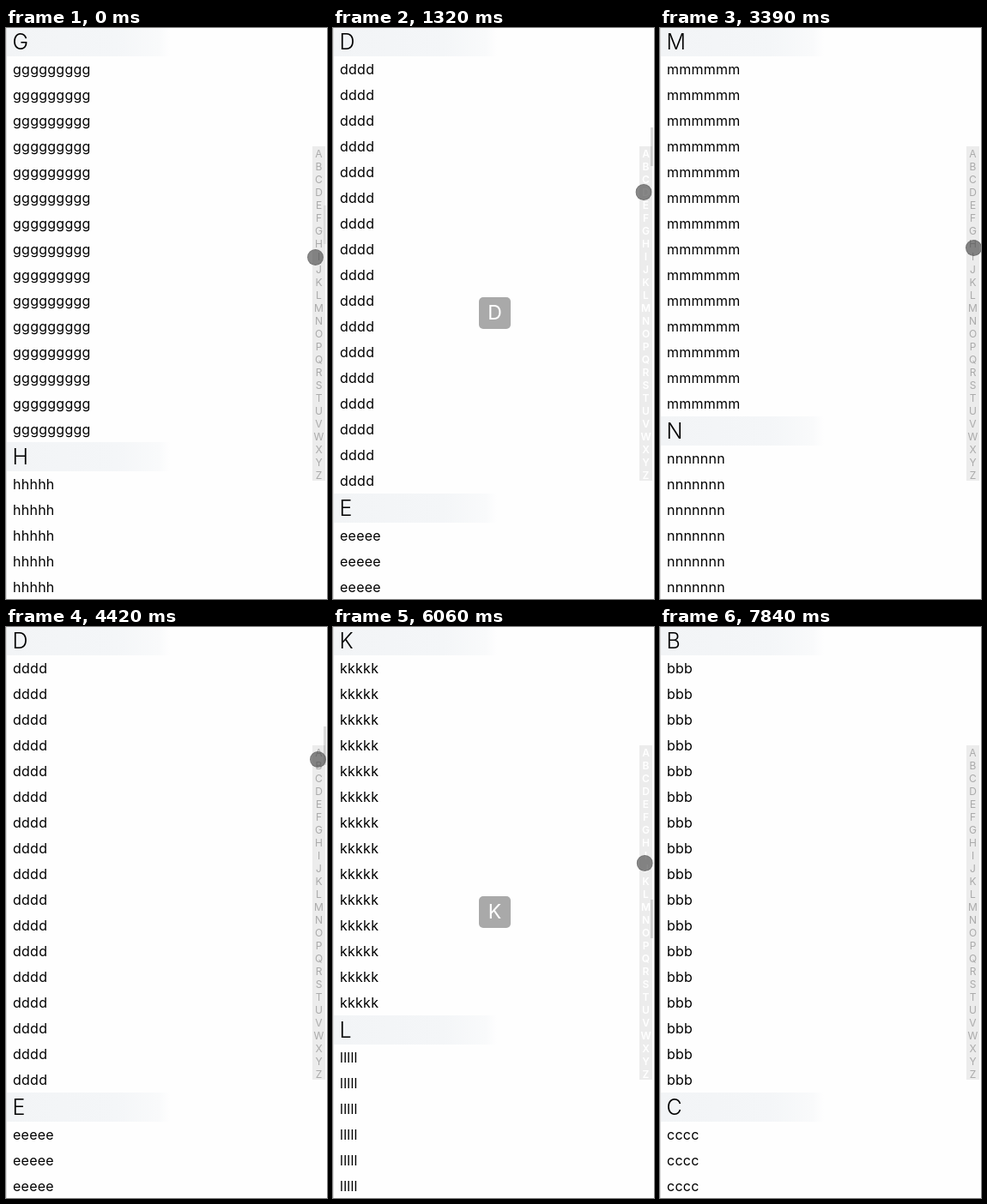
An HTML page that plays this animation: 374x666 px, repeating every 8290 ms.

```html
<!DOCTYPE html>
<html lang="en">
<head>
<meta charset="utf-8">
<title>Alphabet index list</title>
<style>
  html, body { margin: 0; width: 100%; height: 100%; overflow: hidden; }
  body { position: relative; background: #fefefe; font-family: Inter, "Liberation Sans", sans-serif; }
  #stage { position: absolute; left: 0; top: 0; width: 374px; height: 666px; overflow: hidden; }
  #stage::before { content: ""; position: absolute; z-index: 1; left: 0; top: 0; width: 1px; height: 100%; background: #dcdcdc; }
  #list { position: absolute; left: 0; top: -1px; width: 100%; color: #000; }
  #list h2 {
    margin: 0; padding-left: 7.5px; height: 34px; font-weight: 300; font-size: 25px; line-height: 35px;
    background: linear-gradient(90deg, #f2f4f6, #f4f6f8 130px, #f9fafb 178px, #fefefe 191px);
  }
  #list p { margin: 0; padding-left: 8px; height: 30px; font-size: 16px; line-height: 30px; letter-spacing: .25px; }
  #index {
    position: absolute; left: 357px; top: 138px; width: 15px; background: #ececec;
    font-size: 12px; line-height: 15px; text-align: center; color: #aaa;
  }
  #index div { height: 15px; display: flex; justify-content: center; padding-top: .5px; box-sizing: border-box; }
  #index.down { color: #fff; font-weight: 600; }
  #toast {
    position: absolute; left: 170px; top: 314px; width: 37px; height: 37px; border-radius: 5px;
    background: #a9a9a9; color: #fff; font-size: 23px; line-height: 37px; text-align: center;
  }
  #thumb { position: absolute; left: 370px; top: 0; width: 3px; height: 45px; background: rgba(0, 0, 0, .14); }
  #finger {
    position: absolute; left: -9.5px; top: -9.5px; width: 19px; height: 19px; box-sizing: border-box;
    border: 1px solid rgba(70, 70, 70, .25); border-radius: 50%; background: rgba(80, 80, 80, .68);
  }
</style>
</head>
<body>
<div id="stage">
  <div id="list"></div>
  <div id="index"></div>
  <div id="thumb"></div>
  <div id="toast"></div>
  <div id="finger"></div>
</div>
<script>
  const LOOP = 8290, FIRST = 281, STEP = 147.8, LAST = 52, LAG = 0.8;
  const letters = [...'ABCDEFGHIJKLMNOPQRSTUVWXYZ'];
  const lengths = { B: 3, C: 4, D: 4, G: 9, M: 6, N: 7, O: 4, P: 1 };

  // Turning points of the finger: [step, x, y]
  const path = [
    [-4, 360, 236], [0, 360, 267], [8, 361.5, 191], [12, 362, 150], [18, 364, 329], [22, 365, 256],
    [29, 363, 154], [36, 358.5, 369], [44, 367, 181], [46, 364, 157], [52, 350, 690]
  ];
  // Touches: [press step, release step]
  const touches = [[-3, -3], [1, 18], [24, 27], [30, 47]];

  const el = id => document.getElementById(id);
  const list = el('list'), index = el('index'), toast = el('toast'), thumb = el('thumb'), finger = el('finger');
  const clamp = (v, lo, hi) => Math.min(hi, Math.max(lo, v));
  const ease = k => k * k * (3 - 2 * k);

  let height = 0;
  const offsets = letters.map((letter, i) => {
    const top = height;
    const rows = Math.min(17, Math.floor(20.1 - 1.75 * Math.sqrt(i)));
    const row = `<p>${letter.toLowerCase().repeat(lengths[letter] || 5)}</p>`;
    list.insertAdjacentHTML('beforeend', `<h2>${letter}</h2>${row.repeat(rows)}`);
    index.insertAdjacentHTML('beforeend', `<div>${letter}</div>`);
    height += 34 + rows * 30;
    return top;
  });

  function fingerAt(step) {
    const n = Math.max(1, path.findIndex(key => key[0] >= step));
    const [s0, x0, y0] = path[n - 1], [s1, x1, y1] = path[n];
    const k = ease((step - s0) / (s1 - s0));
    return { x: x0 + (x1 - x0) * k, y: y0 + (y1 - y0) * k };
  }

  function draw(step) {
    const [press, release] = touches.filter(touch => touch[0] <= step).pop();
    const down = step < release;
    const { x, y } = fingerAt(step);
    // The list trails the finger slightly and stays put after release.
    const aim = fingerAt(Math.max(press, Math.min(step, release) - LAG));
    const current = clamp(Math.floor((aim.y - 138) / 15), 0, 25);

    finger.style.transform = `translate(${x}px, ${y}px)`;
    list.style.transform = `translateY(${-offsets[current]}px)`;
    thumb.style.transform = `translateY(${Math.round(46 * current ** 0.84)}px)`;
    thumb.style.opacity = clamp((4 - (step - release)) / 2, 0, 1);
    index.classList.toggle('down', down);
    toast.style.visibility = down ? 'visible' : 'hidden';
    toast.textContent = letters[current];
  }

  const start = performance.now();
  function tick() {
    const t = (performance.now() - start) % LOOP;
    draw(clamp(Math.floor((t - FIRST) / STEP) + 1, 0, LAST));
    requestAnimationFrame(tick);
  }
  tick();
</script>
</body>
</html>
```
